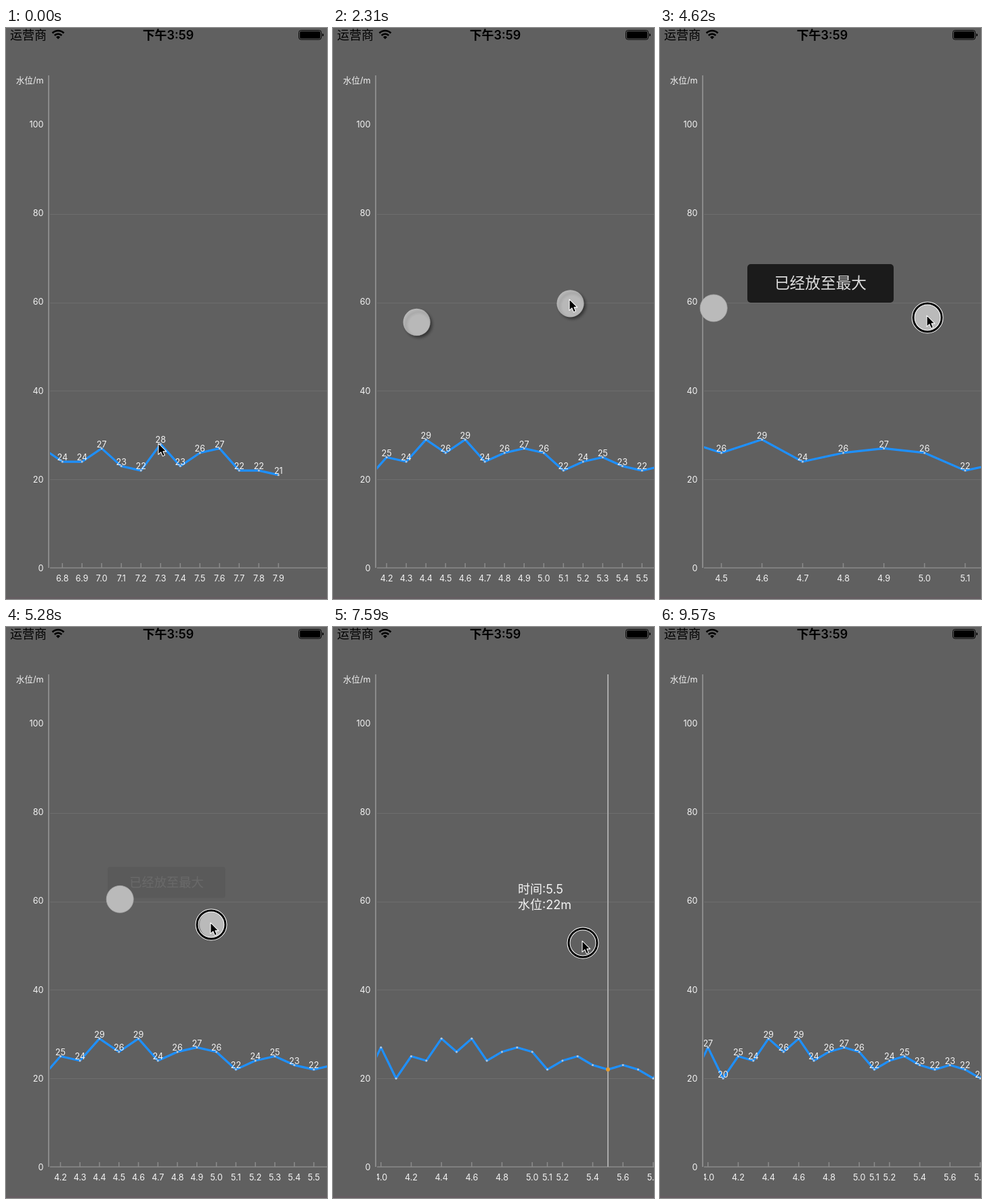
An HTML page for the animation above (9.9 s loop, 474 by 844 pixels).

```html
<!DOCTYPE html>
<html lang="zh">
<head>
<meta charset="utf-8">
<title>水位</title>
<style>
html, body { margin: 0; width: 100%; height: 100%; overflow: hidden; background: #606060; }
svg { display: block; width: 474px; height: 844px; }
text { font: 12.64px Inter, "Noto Sans CJK SC", "Noto Sans CJK", sans-serif; fill: #f4f4f4; }
.mid text { text-anchor: middle; }
.end text { text-anchor: end; }
text.status { font-size: 18px; fill: #000; }
text.tip { font-size: 18px; }
text.toast { font-size: 22.7px; fill: #dedede; text-anchor: middle; }
</style>
</head>
<body>
<svg viewBox="0 0 474 844">
  <defs>
    <clipPath id="plot"><rect x="65" y="60" width="409" height="784"/></clipPath>
    <radialGradient id="knob" cx=".58" cy=".6" r=".6">
      <stop offset=".6" stop-color="#b8b8b8"/><stop offset=".8" stop-color="#aaa"/><stop offset="1" stop-color="#b8b8b8"/>
    </radialGradient>
    <filter id="shadow" x="-30%" y="-30%" width="170%" height="170%">
      <feDropShadow dx="3" dy="3" stdDeviation="2" flood-opacity=".45"/>
    </filter>
  </defs>
  <rect width="474" height="844" fill="#606060"/>
  <rect y="841" width="474" height="3" fill="#645d61"/>
  <text class="status" x="6" y="17">运营商</text>
  <g fill="none" stroke="#000" stroke-width="2.6">
    <path d="M68.5 7.5a12 12 0 0 1 17 0M71.7 11a7.5 7.5 0 0 1 10.6 0"/>
    <path d="M77 16.6l-3-3.2a4.3 4.3 0 0 1 6 0z" fill="#000" stroke="none"/>
  </g>
  <text class="status" x="239.5" y="17" text-anchor="middle" style="font-weight:600">下午3:59</text>
  <rect x="432.5" y="3.5" width="33" height="13.5" rx="3" fill="none" stroke="#000"/>
  <rect x="434" y="5" width="30" height="10.5" rx="1.6"/>
  <path d="M467 8q2 .5 2 2.3t-2 2.3z"/>
  <g id="axis" class="end"></g>
  <g id="chart" clip-path="url(#plot)"></g>
  <g id="overlay"></g>
</svg>
<script>
const STEP = 330, COUNT = 30, MID = { x: 237, y: 421 };
const FIRST = 38, MAX_GAP = 60, PINCH = .419, LAG = .06;
// Last digit of each reading above 20, one per tenth from 3.8
const levels = [..."407054969467624532320586254837447328367221"].map(d => 20 + +d);
// Where the pointer turns: [step, x, y]
const turns = [
  [0, 226, 617], [3, 379, 614], [7, 350, 404], [9, 305, 434], [11, 384, 428], [14, 395, 428],
  [16, 303, 440], [17, 286, 442], [21, 428, 465], [23, 369, 467], [27, 190, 467]
];

const $ = id => document.getElementById(id);
const within = (n, a, b) => n >= a && n <= b;
const clamp = (n, a, b) => Math.min(b, Math.max(a, n));
const dragging = n => within(n, 1, 2);
const pinching = n => within(n, 9, 17);
const probing = n => within(n, 20, 26);

function pointer(n) {
  const j = Math.max(1, turns.findIndex(k => k[0] >= n));
  const [t0, x0, y0] = turns[j - 1], [t1, x1, y1] = turns[j];
  const p = (n - t0) / (t1 - t0);
  return { x: x0 + (x1 - x0) * p, y: y0 + (y1 - y0) * p };
}

// The flick slows down until step 7
const centre = n => 47.44 + 25.86 * (1 - clamp(n / 7, 0, 1)) ** 2.75;

// Distance between readings follows the spread of the fingers
function gapAt(n) {
  const p = pointer(clamp(n, 9, 17));
  return Math.min(MAX_GAP, PINCH * Math.hypot(p.x - MID.x, p.y - MID.y));
}

const levelY = v => 798 - 6.54 * v;
const text = (x, y, s, cls = "") => `<text class="${cls}" x="${x}" y="${y}">${s}</text>`;
const line = (x1, y1, x2, y2, color, w) =>
  `<path d="M${x1} ${y1}L${x2} ${y2}" stroke="${color}" stroke-width="${w}"/>`;
const disc = (x, y, r, attrs) => `<circle cx="${x}" cy="${y}" r="${r}" ${attrs}/>`;

function drawAxis() {
  let s = text(55.5, 82, "水位/m");
  for (let v = 0; v <= 100; v += 20) {
    const y = Math.round(levelY(v)) + .5;
    s += text(55.5, 803 - 6.56 * v, v);
    if (v && v < 100) s += line(65, y, 474, y, "#6d6d6d", 1);
  }
  s += line(63, 70, 63, 798, "#8b8b8b", 2) + line(65, 798, 474, 798, "#8b8b8b", 1.6);
  $("axis").innerHTML = s;
}

function crosshair(n, points) {
  // Trails the pointer by one step
  const at = pointer(Math.max(20, n - 1)).x;
  const p = points.reduce((a, b) => Math.abs(b.x - at) < Math.abs(a.x - at) ? b : a);
  const x = Math.round(p.x), tx = x > MID.x ? x - 133 : x + 55;
  return line(x, 70, x, 798, "#a9a9a9", 2) + disc(x, p.y, 3, 'fill="#e39a2d"') +
    text(tx, 394, "时间:" + (p.i / 10).toFixed(1), "tip") + text(tx, 416.5, `水位:${p.v}m`, "tip");
}

function drawChart(n) {
  const c = centre(n), gap = gapAt(n);
  const points = levels.map((v, k) => ({ v, i: k + FIRST, x: MID.x + (k + FIRST - c) * gap, y: levelY(v) }))
    .filter(p => within(p.x, -80, 560));
  let ticks = "", dots = "", labels = "";
  for (const p of points) {
    // Tight spacing leaves room for even tenths and the narrow 5.1
    if (gap > 26 || p.i % 2 === 0 || p.i === 51) {
      ticks += line(p.x, 791, p.x, 798, "#8b8b8b", 1.5);
      labels += text(p.x, 818, (p.i / 10).toFixed(1));
    }
    dots += disc(p.x, p.y, 1.5, 'fill="#bcc6d0"');
    if (!probing(n)) labels += text(p.x, p.y - 1.7, p.v);
  }
  const path = points.map(p => `${p.x},${p.y}`).join(" ");
  $("chart").innerHTML = ticks +
    `<polyline points="${path}" fill="none" stroke="#1e90ff" stroke-width="3.2" stroke-linejoin="round"/>` +
    dots + `<g class="mid">${labels}</g>` + (probing(n) ? crosshair(n, points) : "");
}

function drawToast(fading) {
  return `<g transform="translate(237 377.5) scale(${fading ? .806 : 1})" opacity="${fading ? .07 : 1}">
    <rect x="-108" y="-28.5" width="216" height="57" rx="5" fill="#1b1b1b"/>${text(0, 7.5, "已经放至最大", "toast")}</g>`;
}

function drawFingers(n) {
  const { x, y } = pointer(n - LAG);
  const look = pinching(n) ? 'fill="#bababa" stroke="#a6a6a6" stroke-width=".8"' : 'fill="url(#knob)" filter="url(#shadow)"';
  return disc(x, y, 20, look) + disc(2 * MID.x - x, 2 * MID.y - y, 20, look);
}

function drawPointer(n) {
  const { x, y } = pointer(n);
  const ring = (color, w) => disc(x, y, 21, `fill="none" stroke="${color}" stroke-width="${w}"`);
  const pressed = dragging(n) || pinching(n) || probing(n);
  return (pressed ? ring("#fff", 5) + ring("#000", 3) : "") +
    `<path transform="translate(${x - 1} ${y - 3}) scale(1.06)" stroke="#fff" stroke-linejoin="round"
      d="M0 0V15.5L3.6 12.2L6 17.8L8.9 16.5L6.5 11.2H11.2Z"/>`;
}

function drawOverlay(n) {
  $("overlay").innerHTML = (within(n, 11, 16) ? drawToast(n === 16) : "") +
    (within(n, 7, 17) ? drawFingers(n) : "") + (n < 28 ? drawPointer(n) : "");
}

const start = performance.now();
let shown = -1;
function frame() {
  const n = Math.floor((performance.now() - start + 1) / STEP) % COUNT;
  if (n !== shown) {
    shown = n;
    drawChart(n);
    drawOverlay(n);
  }
  requestAnimationFrame(frame);
}
drawAxis();
frame();
</script>
</body>
</html>
```
